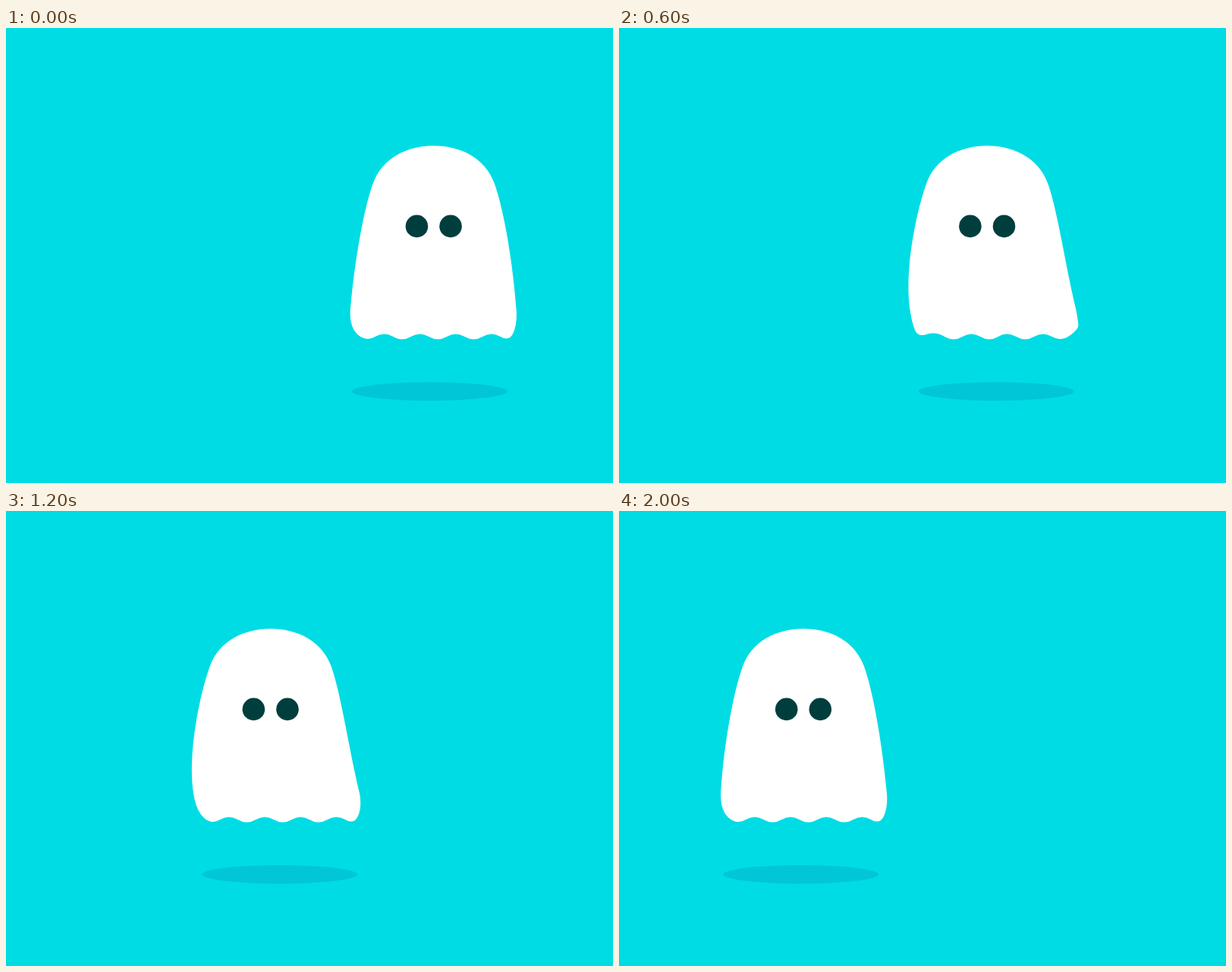
These frames come from a looping animation (800 px wide and 600 px high, 2040 ms). An HTML page:

```html
<!DOCTYPE html>
<html lang="en">
<head>
<meta charset="utf-8">
<title>Floating ghost</title>
<style>
  html, body { margin: 0; width: 100%; height: 100%; overflow: hidden; background: #00dce4; }
  svg { display: block; width: 100vw; height: 100vh; }
</style>
</head>
<body>
<svg viewBox="0 0 800 600">
  <ellipse id="shadow" cy="479.2" rx="102.4" ry="12.2" fill="#00c6d8"/>
  <g id="ghost">
    <path id="sheet" fill="#fff"/>
    <g fill="#003e3e">
      <circle cx="-22.3" cy="261.4" r="14.8"/>
      <circle cx="22.3" cy="261.4" r="14.8"/>
    </g>
  </g>
</svg>
<script>
const STEP = 40, STEPS = 51;
const START_X = 563.7, END_X = 243;
const PERIOD = 47.2;

// step, x, velocity per step
const GLIDE = [
  [0, START_X, -2], [11, 513.3, -6.4], [19, 452.3, -8.8], [26, 386.8, -9.7],
  [34, 312.7, -8.6], [42, 256, -4.6], [50, END_X, 0]
];

const el = id => document.getElementById(id);
const [shadow, ghost, sheet] = ['shadow', 'ghost', 'sheet'].map(el);
const mix = (a, b, t) => a + (b - a) * t;
const mixPoint = (a, b, t) => [mix(a[0], b[0], t), mix(a[1], b[1], t)];
const smooth = (from, to, v) => {
  const t = Math.min(1, Math.max(0, (v - from) / (to - from)));
  return t * t * (3 - 2 * t);
};
const text = points => points.map(p => p.map(n => n.toFixed(2)).join(' ')).join(' ');

function glide(step) {
  let i = 0;
  while (i < GLIDE.length - 2 && step >= GLIDE[i + 1][0]) i++;
  const [s0, x0, v0] = GLIDE[i], [s1, x1, v1] = GLIDE[i + 1];
  const span = s1 - s0, t = (step - s0) / span;
  return mix(x0, x1, t * t * (3 - 2 * t))
    + span * (v0 * t * (1 - t) ** 2 + v1 * t * t * (t - 1));
}

// Extremes of the wavy hem, flattened towards the two corners
function hemPoints(anchor, left, right) {
  const points = [];
  const half = PERIOD / 2;
  for (let k = Math.ceil((left - anchor) / half); anchor + k * half < right; k++) {
    const x = anchor + k * half;
    const inset = Math.min(x - left, right - x);
    points.push([x, Math.min(k % 2 ? 400 : 414, 396 + 1.85 * inset)]);
  }
  return points;
}

function sheetPath(lag, anchor) {
  const shape = (rest, moving) => mixPoint(rest, moving, lag);
  const hipL = shape([-105, 312], [-110, 320]), endL = shape([-110, 373], [-101.5, 373]);
  const hipR = shape([104.5, 312], [103.5, 316]), endR = shape([109, 373], [117.5, 373]);
  const footL = shape([-110.8, 396], [-98, 396]), footR = shape([110.5, 396], [121.5, 396]);

  const hem = hemPoints(anchor, footL[0], footR[0]);
  const corner = (end, foot, inset) =>
    mixPoint(end, foot, (12 + 11 * Math.min(1, inset / (PERIOD / 2))) / 23);
  const nodes = [
    corner(endL, footL, hem[0][0] - footL[0]),
    ...hem,
    corner(endR, footR, footR[0] - hem[hem.length - 1][0])
  ];

  let d = 'M0 155.3C' + text([[-36, 155.3], [-68, 172], [-80, 205]])
    + 'C' + text([[-93, 241], hipL, endL]);
  nodes.forEach((node, i) => {
    const next = nodes[i + 1];
    d += 'Q' + text([node, next ? mixPoint(node, next, 0.5) : endR]);
  });
  return d + 'C' + text([hipR, [93, 241], [80, 205]])
    + 'C' + text([[68, 172], [36, 155.3], [0, 155.3]]) + 'Z';
}

function draw(ms) {
  const step = Math.floor(ms / STEP) % STEPS;
  const x = glide(step);
  const progress = (START_X - x) / (START_X - END_X);
  const lag = smooth(0, 11, step) * (1 - smooth(39.7, 52.9, step));
  const anchor = -89 + 3 * PERIOD * progress + 10 * lag;

  ghost.setAttribute('transform', `translate(${x.toFixed(2)} 0)`);
  shadow.setAttribute('cx', (x - 5.4 + 17.5 * lag).toFixed(2));
  sheet.setAttribute('d', sheetPath(lag, anchor));
}

const begin = performance.now();
function tick() {
  draw(performance.now() - begin);
  requestAnimationFrame(tick);
}
tick();
</script>
</body>
</html>
```
